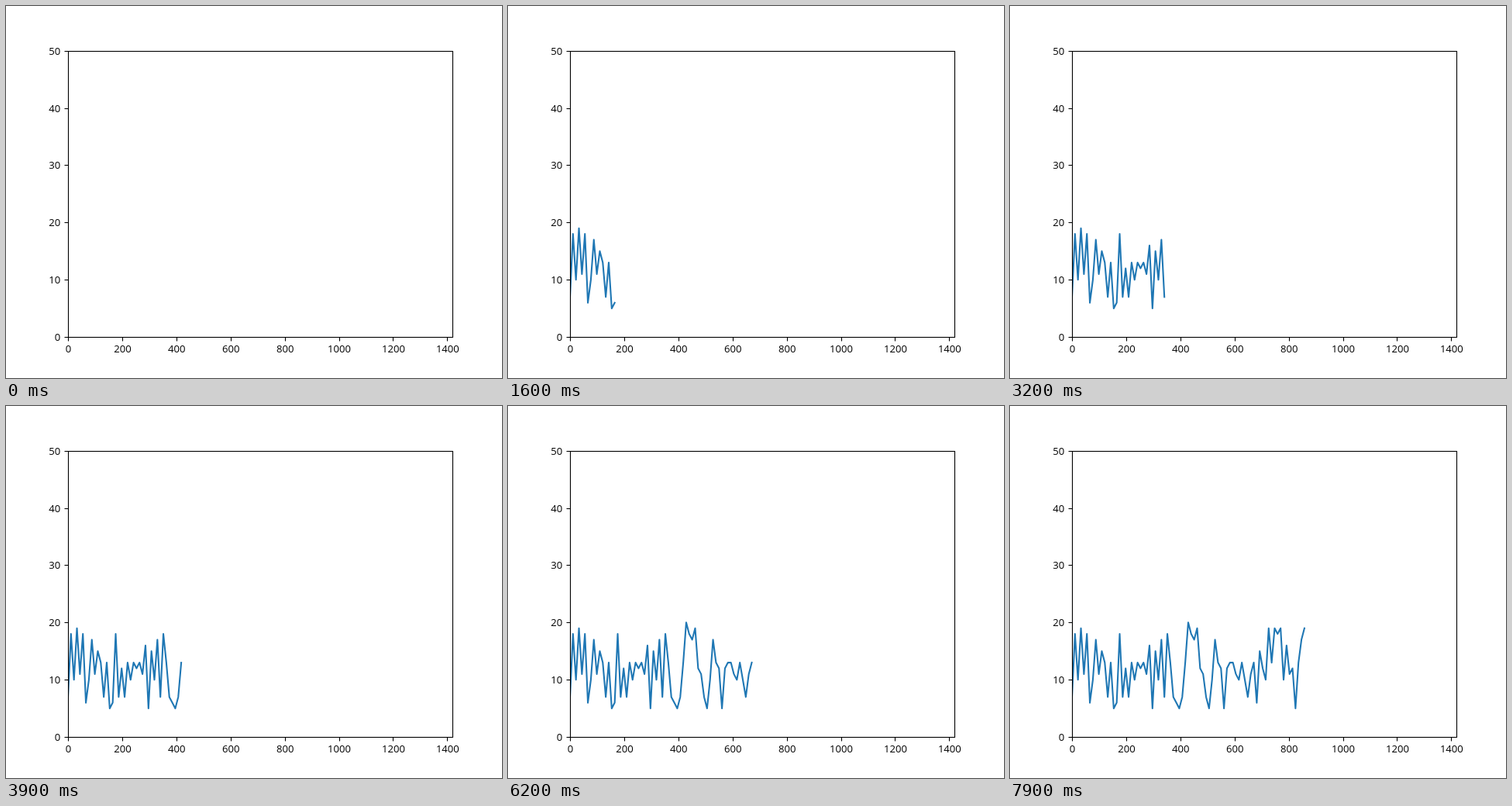
An HTML page with a canvas that plays this animation: 640 by 480 pixels, repeating every 8 s.

```html
<!DOCTYPE html>
<html lang="en">
<head>
<meta charset="utf-8">
<title>Line chart</title>
<style>
  html, body { margin: 0; width: 100%; height: 100%; overflow: hidden; background: #fff; }
  canvas { display: block; }
</style>
</head>
<body>
<canvas id="chart" width="640" height="480"></canvas>
<script>
const ctx = document.getElementById('chart').getContext('2d');

const LOOP = 8000, STEP = 100;
const LEFT = 80, RIGHT = 576, TOP = 57.6, BOTTOM = 427.2;
const X_MAX = 1419, Y_MAX = 50, X_GAP = 11;
const TICK = 5;

const values = [
  7, 18, 10, 19, 11, 18, 6, 10, 17, 11, 15, 13, 7, 13, 5, 6, 18, 7, 12, 7,
  13, 10, 13, 12, 13, 11, 16, 5, 15, 10, 17, 7, 18, 13, 7, 6, 5, 7, 13, 20,
  18, 17, 19, 12, 11, 7, 5, 10, 17, 13, 12, 5, 12, 13, 13, 11, 10, 13, 10, 7,
  11, 13, 6, 15, 12, 10, 19, 13, 19, 18, 19, 10, 16, 11, 12, 5, 13, 17, 19
];

const px = x => LEFT + x / X_MAX * (RIGHT - LEFT);
const py = y => BOTTOM - y / Y_MAX * (BOTTOM - TOP);
const snap = v => Math.floor(v + 0.5) + 0.5;

function segment(x1, y1, x2, y2) {
  ctx.beginPath();
  ctx.moveTo(x1, y1);
  ctx.lineTo(x2, y2);
  ctx.stroke();
}

function drawAxes() {
  const left = snap(LEFT), bottom = snap(BOTTOM), top = snap(TOP);
  ctx.strokeStyle = ctx.fillStyle = '#000';
  ctx.lineWidth = 1.11;
  ctx.lineCap = 'butt';
  ctx.lineJoin = 'miter';
  ctx.strokeRect(left, top, snap(RIGHT) - left, bottom - top);

  ctx.font = '13.1px "Open Sans", "Noto Sans", sans-serif';
  ctx.textBaseline = 'alphabetic';
  ctx.textAlign = 'center';
  for (let x = 0; x <= 1400; x += 200) {
    const p = snap(px(x));
    segment(p, bottom, p, bottom + TICK);
    ctx.fillText(x, px(x) + 0.5, 447);
  }
  ctx.textAlign = 'right';
  for (let y = 0; y <= Y_MAX; y += 10) {
    const p = snap(py(y));
    segment(left, p, left - TICK, p);
    ctx.fillText(y, 70.3, p + 4.5);
  }
}

function drawLine(last) {
  if (last < 1) return;
  ctx.save();
  ctx.beginPath();
  ctx.rect(LEFT, 58, RIGHT - LEFT, 369);
  ctx.clip();
  ctx.strokeStyle = '#1f77b4';
  ctx.lineWidth = 2.08;
  ctx.lineCap = 'square';
  ctx.lineJoin = 'round';
  ctx.beginPath();
  for (let i = 0; i <= last; i++) ctx.lineTo(px(i * X_GAP), py(values[i]));
  ctx.stroke();
  ctx.restore();
}

function draw() {
  const t = performance.now() % LOOP;
  ctx.fillStyle = '#fff';
  ctx.fillRect(0, 0, 640, 480);
  drawLine(Math.floor(t / STEP) - 1);
  drawAxes();
  requestAnimationFrame(draw);
}
draw();
</script>
</body>
</html>
```
